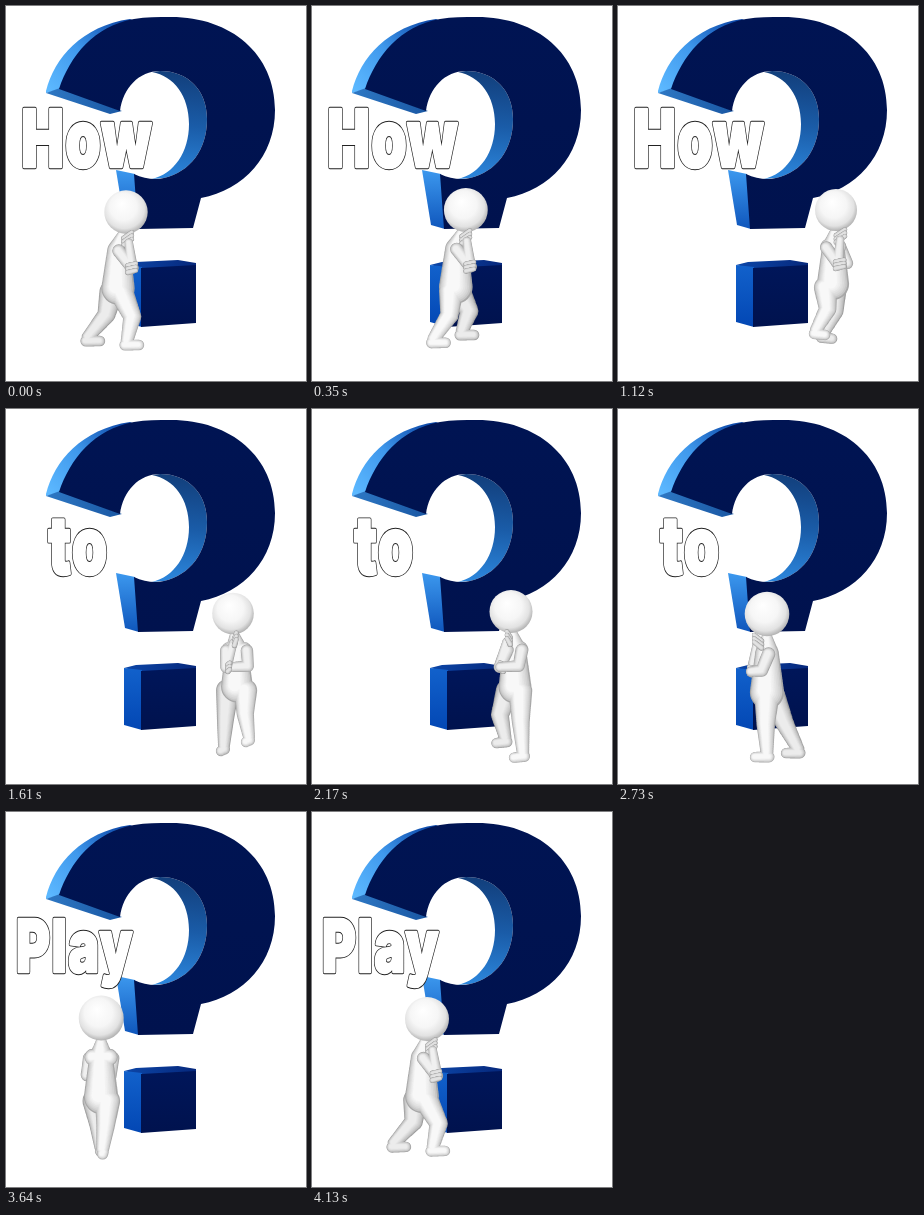
Animation of 300 by 375 pixels, one loop 4.2 s. Source, as an HTML page with a canvas:

```html
<!DOCTYPE html>
<html lang="en">
<head>
<meta charset="utf-8">
<title>How to play</title>
<style>
  html, body { margin: 0; width: 100%; height: 100%; overflow: hidden; background: #fff; }
  canvas { display: block; }
</style>
</head>
<body>
<canvas id="stage" width="300" height="375"></canvas>
<script>
const ctx = document.getElementById('stage').getContext('2d');
const LOOP = 4200, TICK = 70;
const mix = (a, b, u) => a + (b - a) * u;

// time, head x, head y, head radius, hip offset, facing (0 right, 90 viewer, 180 left)
const keys = [
  [0, 120, 206, 21.7, -8, 0],
  [630, 180, 203, 22, -10, 4],
  [1120, 218, 204, 21, -3, 40],
  [1610, 227, 204.5, 20.8, 4, 104],
  [2170, 199, 202.5, 21.5, 4, 138],
  [2730, 149, 205, 22.3, 0, 172],
  [3220, 107, 206, 22.8, 0, 186],
  [3620, 95, 206, 22.5, 0, 270],
  [4130, 115, 207, 22, -5, 355]
];

// Footsteps: lift time, landing time, x, y
const steps = {
  right: [
    [330, 620, 178, 334], [980, 1230, 217, 341], [1990, 2290, 176, 344],
    [2740, 2990, 119, 343], [3280, 3520, 97, 341], [3830, 4080, 125, 339]
  ],
  left: [
    [70, 370, 155, 331], [680, 960, 208, 332], [1250, 1500, 242, 332], [1680, 1960, 208, 348],
    [2330, 2640, 145, 348], [3000, 3220, 98, 351], [3560, 3800, 86, 335]
  ]
};

const words = [
  { text: 'How', x: 81, y: 161, size: 80 },
  { text: 'to', x: 72.5, y: 165, size: 80 },
  { text: 'Play', x: 69, y: 160, size: 73 }
];

function keyAt(i, col) {
  const n = keys.length, lap = Math.floor(i / n);
  const wrap = col === 0 ? LOOP : col === 5 ? 360 : 0;
  return keys[i - lap * n][col] + lap * wrap;
}

// Smooth curve through the keys, closed over the loop
function poseAt(t) {
  let i = keys.length - 1;
  while (keys[i][0] > t) i--;
  const t0 = keyAt(i, 0), span = keyAt(i + 1, 0) - t0, u = (t - t0) / span;
  const slope = (j, c) => (keyAt(j + 1, c) - keyAt(j - 1, c)) / (keyAt(j + 1, 0) - keyAt(j - 1, 0));
  const value = c => {
    const a = keyAt(i, c), b = keyAt(i + 1, c), e = u * u * (3 - 2 * u);
    return mix(a, b, e) + span * u * (1 - u) * ((1 - u) * slope(i, c) - u * slope(i + 1, c));
  };
  return { x: value(1), y: value(2), r: value(3), lean: value(4), turn: value(5) * Math.PI / 180 };
}

function footAt(plan, t) {
  let i = plan.length - 1;
  while (i >= 0 && plan[i][0] > t) i--;
  if (i < 0) return { x: plan.at(-1)[2], y: plan.at(-1)[3] };
  const [lift, land, x, y] = plan[i], from = plan.at(i - 1);
  const u = Math.min(1, (t - lift) / (land - lift)), e = u * u * (3 - 2 * u);
  return { x: mix(from[2], x, e), y: mix(from[3], y, e) - 10 * Math.sin(Math.PI * u) };
}

function gradient(x0, y0, x1, y1, ...colors) {
  const g = ctx.createLinearGradient(x0, y0, x1, y1);
  colors.forEach((c, i) => g.addColorStop(i / (colors.length - 1), c));
  return g;
}

function shape(d, fill) {
  ctx.fillStyle = fill;
  ctx.fill(new Path2D(d));
}

function drawMark() {
  // hook side and end
  shape('M40 85C48 52 76 20 124 13L140 20L60 86L52 84L40 87Z', gradient(45, 85, 115, 15, '#5cb8ff', '#3f98ec', '#0f4cac'));
  shape('M40 87L54 82L116 105L104 108Z', gradient(40, 0, 114, 0, '#2e78c4', '#1a58a4'));
  // inside of the bowl
  shape('M154 65C182 65 201 84 201 113C201 144 184 166 158 172L146 173C168 168 183 146 183 118C183 90 168 70 146 66Z',
    gradient(175, 66, 165, 172, '#123f7c', '#1a5ca8', '#2c86dc'));
  // stem side
  shape('M110 164L129 168L133 223L119 219Z', gradient(0, 164, 0, 223, '#3c98ee', '#0f56bc'));
  // front face
  shape('M53 83C64 50 88 20 128 13C140 11 152 11 165 11C225 11 269 48 269 104C269 150 238 184 195 192L187 222L132 223L128 168' +
    'C138 173 150 174 158 172C184 166 201 144 201 113C201 84 182 65 154 65C133 65 117 82 114 105Z',
    gradient(0, 11, 0, 223, '#001453', '#001350', '#00124e'));
  // dot
  shape('M118 259L130 256L172 254L190 257L190 260L135 263Z', gradient(118, 0, 190, 0, '#0c46a8', '#06287c'));
  shape('M118 259L136 261L136 321L118 316Z', gradient(0, 257, 0, 321, '#1262cc', '#0347b4'));
  shape('M135 262L190 259L190 317L135 321Z', gradient(0, 258, 0, 321, '#00165a', '#00124e'));
}

function drawWord({ text, x, y, size }) {
  ctx.save();
  ctx.translate(x, y);
  ctx.scale(0.71, 1); // condensed poster look
  ctx.font = `900 ${size}px Inter, Roboto, "Liberation Sans", sans-serif`;
  ctx.letterSpacing = '2px';
  ctx.textAlign = 'center';
  ctx.lineJoin = 'round';
  // a dark rim under a white, thickened face
  for (const [color, width] of [['#222', 4.4], ['#fff', 2.6]]) {
    ctx.strokeStyle = color;
    ctx.lineWidth = width;
    ctx.strokeText(text, 0, 0);
  }
  ctx.fillStyle = '#fff';
  ctx.fillText(text, 0, 0);
  ctx.restore();
}

// Soft shaded union of tubes; each tube is a chain of [x, y, radius]
function blob(tubes, dim = 0) {
  const layers = 7, cuts = 16;
  for (let k = 0; k <= layers; k++) {
    const f = k / layers, grey = Math.round(mix(168, 248, Math.pow(f, 0.5)) - dim);
    ctx.beginPath();
    for (const tube of tubes) {
      for (let i = 0; i + 1 < tube.length; i++) {
        for (let j = 0; j <= cuts; j++) {
          const [x, y, r] = tube[i].map((v, n) => mix(v, tube[i + 1][n], j / cuts));
          const cx = x - 0.15 * f * r, cy = y - 0.1 * f * r, cr = r * (1 - 0.6 * f);
          ctx.moveTo(cx + cr, cy);
          ctx.arc(cx, cy, cr, 0, 2 * Math.PI);
        }
      }
    }
    ctx.fillStyle = `rgb(${grey},${grey},${grey})`;
    ctx.fill();
  }
}

function drawHead({ x, y, r }) {
  const g = ctx.createRadialGradient(x - r * 0.2, y - r * 0.4, 0, x - r * 0.06, y - r * 0.12, r * 1.14);
  g.addColorStop(0, '#ffffff');
  g.addColorStop(0.55, '#f6f6f6');
  g.addColorStop(0.82, '#e2e2e2');
  g.addColorStop(1, '#aeaeae');
  ctx.fillStyle = g;
  ctx.beginPath();
  ctx.arc(x, y, r, 0, 2 * Math.PI);
  ctx.fill();
}

function drawWalker(t) {
  const head = poseAt(t), s = head.r / 21.5, top = head.y - head.r;
  const cos = Math.cos(head.turn), sin = Math.sin(head.turn);
  const chestX = head.x + head.lean * 0.9;
  const hip = { x: head.x + head.lean, y: top + 97 * s };

  // forward, toward the right hand, down from the crown, radius
  const joint = (f, l, d, r) => [chestX + s * (f * cos - l * sin), top + d * s, r * s];
  const depth = (f, l) => f * sin + l * cos;

  function leg(side) {
    const foot = footAt(side > 0 ? steps.right : steps.left, t);
    const hx = hip.x - side * 6 * sin + (foot.x - hip.x) * 0.25, hy = hip.y + 4;
    const ax = foot.x - 4 * cos, ay = foot.y - 4;
    const len = 53 * s, d = Math.hypot(ax - hx, ay - hy);
    const bend = Math.min(9, Math.sqrt(Math.max(9, len * len - d * d)) / 2.6);
    return [
      [[hx, hy, 12 * s], [(hx + ax) / 2 + bend * cos, (hy + ay) / 2, 9 * s], [ax, ay, 6.2 * s]],
      [[foot.x - 6 * cos, foot.y - sin, 5.6], [foot.x + 8 * cos, foot.y + sin, 5.2]]
    ];
  }

  function hand(f, l, d, tilt) {
    for (let i = -1; i <= 1; i++) {
      const [x, y] = joint(f, l, d + i * 3.4, 0);
      blob([[[x - 4 * cos - sin, y + tilt, 2.7], [x + 4 * cos + 3 * sin, y - tilt, 2.3]]], 22);
    }
  }

  const near = cos >= 0 ? 1 : -1;
  const torso = [
    [[mix(chestX, head.x, 0.5), top + 45 * s, 5.5 * s], [chestX, top + 60 * s, 11.5 * s], [hip.x, hip.y, 16.5 * s]],
    [joint(0, -8, 59, 8), joint(0, 8, 59, 8)]
  ];
  const parts = [
    { z: -1, draw: () => { blob(leg(-near), 12); blob([...torso, ...leg(near)]); } },
    { z: 0, draw: () => drawHead(head) },
    { z: depth(4, -12), draw: () => blob([[joint(0, -11, 60, 6.5), joint(7, -14, 76, 6), joint(15, 5, 77, 4.8)]], 8) },
    { z: depth(10, 8), draw: () => blob([[joint(0, 11, 60, 6.5), joint(13, 8, 77, 6), joint(10, 1, 52, 4.2)]], 8) },
    { z: depth(14, 8) + 0.5, draw: () => hand(13, 6, 77, 1) },
    { z: depth(10, 3) + 1, draw: () => hand(9, 0, 48, 3) }
  ];
  parts.sort((a, b) => a.z - b.z).forEach(p => p.draw());
}

function render(now) {
  const t = Math.floor(now / TICK) * TICK % LOOP;
  ctx.fillStyle = '#fff';
  ctx.fillRect(0, 0, 300, 375);
  drawMark();
  drawWord(words[Math.floor(t / (LOOP / words.length))]);
  drawWalker(t);
}

const start = performance.now();
function loop() {
  render(performance.now() - start);
  requestAnimationFrame(loop);
}
loop();
</script>
</body>
</html>
```
